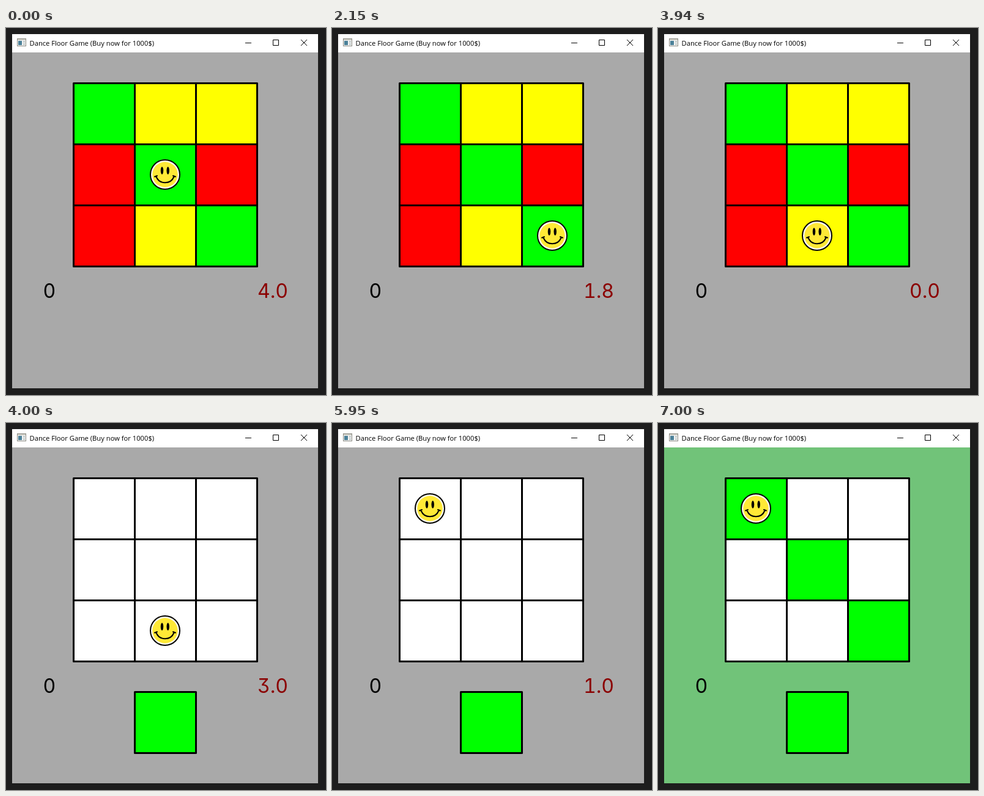
Recreate the animation shown at these times as an HTML page. Size 523 px wide and 601 px high, loop 8000 ms.

```html
<!DOCTYPE html>
<html lang="en">
<head>
<meta charset="utf-8">
<title>Dance Floor Game</title>
<style>
  html, body { margin: 0; width: 100%; height: 100%; overflow: hidden; background: #1d1d1d; }
  svg { display: block; }
  .title { font: 11.2px "Open Sans", sans-serif; }
  .num { font: 32px Inter, sans-serif; font-feature-settings: "tnum", "cv09"; }
  .tile { stroke: #000; stroke-width: 3; stroke-linejoin: round; }
  .line { fill: none; stroke: #000; }
</style>
</head>
<body>
<svg width="523" height="601" viewBox="0 0 523 601">
  <rect id="floor" x="10" y="40" width="500" height="550"/>
  <rect x="10" y="10" width="500" height="30" fill="#fff"/>

  <!-- window icon and buttons -->
  <rect x="18.5" y="17.5" width="14" height="12" fill="#f4f4f4" stroke="#8d8d86"/>
  <path d="M19 18h13v2h-13z" fill="#c9c9c0"/>
  <path d="M20 21h6v7h-6z" fill="#4c8199"/>
  <path d="M28 21h3v3h-3zM28 25h3v3h-3z" fill="#c4cccb"/>
  <text class="title" x="38.5" y="29">Dance Floor Game (Buy now for 1000$)</text>
  <path class="line" d="M391 24.5h10M436.5 19.5h9v9h-9zM482 19l10 10M492 19l-10 10"/>

  <g id="grid"></g>
  <rect id="goal" class="tile" x="210.5" y="440.5" width="100" height="100" fill="#0f0"/>

  <g id="face">
    <circle r="24" fill="#fffdf0" stroke="#000" stroke-width="2"/>
    <circle r="20.7" fill="#ffe936"/>
    <ellipse cx="-5" cy="-6.5" rx="2.2" ry="6.2"/>
    <ellipse cx="4.7" cy="-6.5" rx="2.2" ry="6.2"/>
    <path class="line" stroke-width="2" stroke-linecap="round"
      d="M-14.5 3.5C-9 16.5 9 16.5 14.5 3.5M-17 3.5l4-1.5M17 3.5l-4-1.5"/>
  </g>

  <text class="num" x="60.5" y="442">0</text>
  <text class="num" id="timer" x="411" y="442" fill="#8b0000"></text>
</svg>
<script>
const LOOP = 8000, RECALL = 4000, REVEAL = 7000;
const TIMER_ENDS = [3989, 6978];
const PATTERN = 'GYYRGRRYG';
const COLORS = { G: '#0f0', Y: '#ff0', R: '#f00' };

// [start time, column, row]
const MOVES = [
  [0, 1, 1], [840, 2, 1], [1600, 2, 2], [2440, 1, 2],
  [4630, 1, 1], [5110, 1, 0], [5730, 0, 0]
];

const get = id => document.getElementById(id);
const [floor, grid, goal, face, timer] = ['floor', 'grid', 'goal', 'face', 'timer'].map(get);

const tiles = [...PATTERN].map((_, i) => {
  const tile = document.createElementNS('http://www.w3.org/2000/svg', 'rect');
  const attrs = {
    class: 'tile', width: 100, height: 100,
    x: 110.5 + i % 3 * 100, y: 90.5 + Math.floor(i / 3) * 100
  };
  for (const name in attrs) tile.setAttribute(name, attrs[name]);
  return grid.appendChild(tile);
});

function tileColor(key, t) {
  const shown = t < RECALL || (t >= REVEAL && key === 'G');
  return shown ? COLORS[key] : '#fff';
}

function draw(t) {
  floor.setAttribute('fill', t < REVEAL ? '#a9a9a9' : '#71c379');
  tiles.forEach((tile, i) => tile.setAttribute('fill', tileColor(PATTERN[i], t)));
  goal.setAttribute('visibility', t < RECALL ? 'hidden' : 'visible');

  const [, col, row] = MOVES.findLast(move => move[0] <= t);
  face.setAttribute('transform', `translate(${260 + (col - 1) * 100} ${240 + (row - 1) * 100})`);

  const end = TIMER_ENDS[t < RECALL ? 0 : 1];
  timer.textContent = t < REVEAL ? (Math.max(0, end - t) / 1000).toFixed(1) : '';
}

const start = performance.now();
function tick() {
  draw((performance.now() - start) % LOOP);
  requestAnimationFrame(tick);
}
tick();
</script>
</body>
</html>
```
